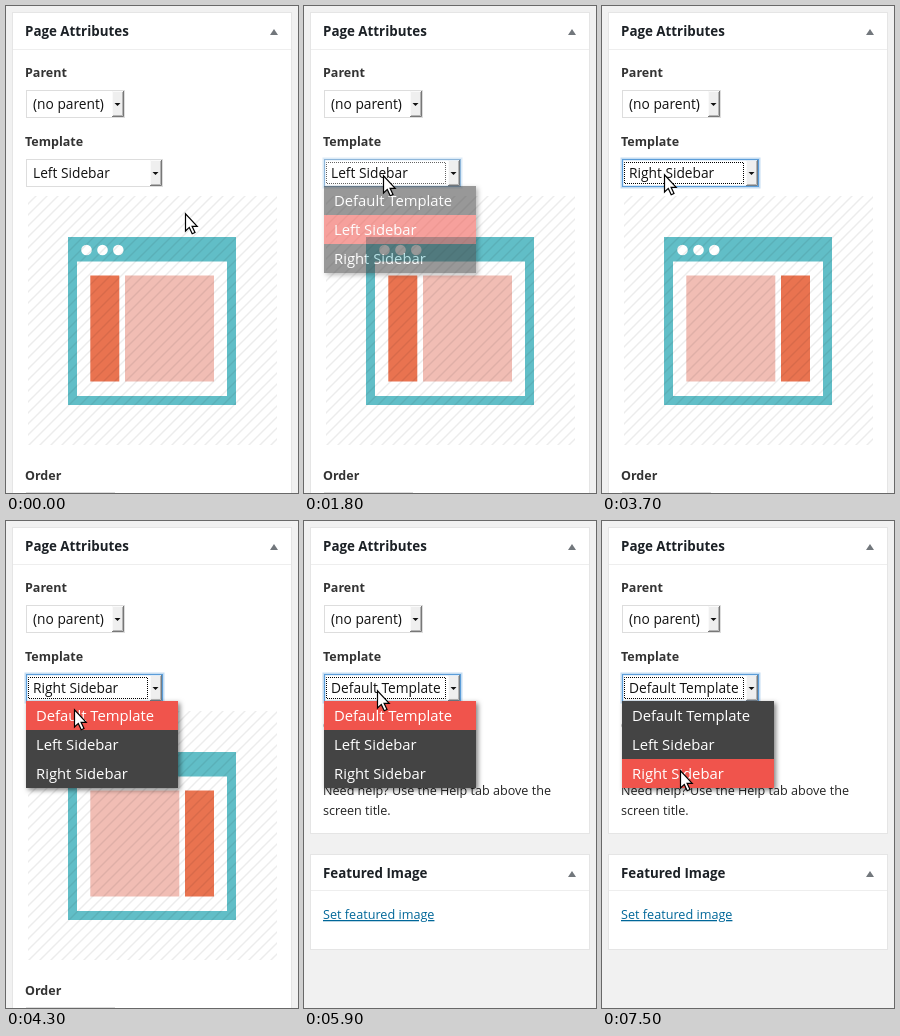
An HTML page that plays this animation: 292 px wide and 487 px high, repeating every 8000 ms.

```html
<!DOCTYPE html>
<html lang="en">
<head>
<meta charset="utf-8">
<title>Page template picker</title>
<style>
  html, body { margin: 0; width: 100%; height: 100%; overflow: hidden; background: #f1f1f1; }
  svg { display: block; width: 292px; height: 487px; font: 13.75px "Open Sans", "Noto Sans", sans-serif; fill: #111; }
  .title { font-size: 13.35px; font-weight: 700; fill: #1c2126; }
  .label { font-size: 12.5px; font-weight: 700; fill: #333; }
  .note { font-size: 12.6px; fill: #222; }
  .link { font-size: 12.65px; fill: #006799; text-decoration: underline; }
  .panel { fill: #fff; stroke: #e5e5e5; }
  .rule { stroke: #eee; }
  .field { fill: #fff; stroke: #ddd; }
  .fold { fill: #72777c; }
  #menu { font-size: 14.8px; fill: #fff; filter: drop-shadow(2px 2px 2.5px rgba(0,0,0,.5)); }
  #focus { fill: none; }
</style>
</head>
<body>
<svg viewBox="0 0 292 487">
  <defs>
    <pattern id="hatch" width="11" height="11" patternUnits="userSpaceOnUse">
      <path d="M-2 13L13 -2M-2 2L2 -2M9 13L13 9" stroke="#000" stroke-opacity=".075" stroke-width="1.4"/>
    </pattern>
    <g id="drop">
      <rect width="12" height="26" fill="#efefef"/>
      <path d="M.5 26V.5H12" fill="none" stroke="#fafafa"/>
      <path d="M0 25.5H11.5V0" fill="none" stroke="#777"/>
      <path d="M1 24.5H10.5V1" fill="none" stroke="#b5b5b5"/>
      <path d="M2.5 12H8.5L5.5 15Z" fill="#111"/>
    </g>
  </defs>

  <rect id="panel" class="panel" x="6.5" y="6.5" width="279"/>
  <path class="rule" d="M7 43.5H285"/>
  <text class="title" x="19" y="30">Page Attributes</text>
  <path class="fold" d="M264 29H272L268 23Z"/>

  <text class="label" x="19" y="71">Parent</text>
  <rect class="field" x="20.5" y="84.5" width="98" height="27"/>
  <text x="27" y="103">(no parent)</text>
  <use href="#drop" x="106" y="85"/>

  <text class="label" x="19" y="140">Template</text>
  <rect class="field" x="20.5" y="153.5" width="136" height="27"/>
  <text id="value" x="27" y="172"></text>
  <use href="#drop" x="144" y="154"/>
  <g id="focus">
    <rect x="20" y="153" width="137" height="28" stroke="#5b9dd9" stroke-opacity=".35" stroke-width="3"/>
    <rect x="20.5" y="153.5" width="136" height="27" stroke="#5b9dd9"/>
    <rect x="22.5" y="156.5" width="119" height="21" stroke="#000" stroke-dasharray="1" stroke-dashoffset=".5"/>
  </g>

  <g id="preview">
    <rect x="62" y="231" width="168" height="168" fill="#61bec7"/>
    <rect x="71" y="255.5" width="150" height="134.5" fill="#fff"/>
    <g fill="#fff">
      <circle cx="80.5" cy="244" r="5.3"/><circle cx="96.5" cy="244" r="5.3"/><circle cx="112.3" cy="244" r="5.3"/>
    </g>
    <rect id="side" y="269.5" width="29" height="106" fill="#e97350"/>
    <rect id="main" y="269.5" width="89" height="106" fill="#f1bdb4"/>
    <rect x="22" y="190" width="249" height="249" fill="url(#hatch)"/>
  </g>

  <g id="order">
    <text class="label" x="19" y="209">Order</text>
    <rect class="field" x="20.5" y="221.5" width="88" height="24"/>
    <text x="26" y="239">0</text>
    <text class="note" x="19" y="274">Need help? Use the Help tab above the</text>
    <text class="note" x="19" y="294">screen title.</text>
  </g>

  <g id="featured">
    <rect class="panel" x="6.5" y="333.5" width="279" height="95"/>
    <path class="rule" d="M7 369.5H285"/>
    <text class="title" x="19" y="357">Featured Image</text>
    <path class="fold" d="M264 356H272L268 350Z"/>
    <text class="link" x="19" y="398">Set featured image</text>
  </g>

  <g id="menu">
    <rect x="20" y="180" width="152" height="87" fill="#444"/>
    <rect id="mark" x="20" width="152" height="29" fill="#f0544c"/>
    <text x="30" y="200">Default Template</text>
    <text x="30" y="229">Left Sidebar</text>
    <text x="30" y="258">Right Sidebar</text>
  </g>

  <path id="cursor" d="M.5 .8V18L4.3 14.4L7.2 20.8L10 19.5L7.1 13.3H12.2Z" fill="#fff" stroke="#000" stroke-width="1.2"/>
</svg>
<script>
const LOOP = 8000, STEP = 100;
const TEMPLATES = ["Default Template", "Left Sidebar", "Right Sidebar"];
const START = [179, 207];
// start time, steps, target x, target y
const MOVES = [
  [400, 7, 80, 175], [1200, 4, 79, 169], [1900, 7, 80, 249], [3400, 4, 62, 168],
  [4100, 4, 69, 192], [5300, 4, 73, 169], [6100, 4, 74, 220], [7200, 4, 78, 249]
];
// time, value from then on
const MENU = [[0, 0], [1800, .55], [1900, 1], [2900, .5], [3000, 0], [4000, .55], [4100, 1], [5100, 0], [5900, 1]];
const CHOICE = [[0, 1], [2900, 2], [5100, 0]];
const FOCUS = [[0, 0], [1800, .6], [1900, 1]];

const el = id => document.getElementById(id);
const set = (id, name, value) => el(id).setAttribute(name, value);
const show = (id, on) => set(id, "visibility", on ? "visible" : "hidden");
const at = (track, t) => track.filter(k => k[0] <= t).pop()[1];
const ease = p => p * p * (3 - 2 * p);

function pointer(t) {
  let [x, y] = START;
  for (const [start, steps, tx, ty] of MOVES) {
    if (t < start) break;
    const p = ease(Math.min(1, (Math.floor((t - start) / STEP) + 1) / steps));
    x += (tx - x) * p;
    y += (ty - y) * p;
  }
  return [Math.round(x), Math.round(y)];
}

function draw(t) {
  const [x, y] = pointer(t);
  const choice = at(CHOICE, t);
  const plain = choice === 0, left = choice === 1;
  const row = y >= 180 ? Math.min(2, Math.floor((y - 180) / 29)) : choice;

  el("value").textContent = TEMPLATES[choice];
  set("focus", "opacity", at(FOCUS, t));
  show("preview", !plain);
  show("featured", plain);
  set("side", "x", left ? 84.3 : 179);
  set("main", "x", left ? 119 : 84.3);
  set("panel", "height", plain ? 306 : 571);
  set("order", "transform", `translate(0 ${plain ? 0 : 265})`);
  set("menu", "opacity", at(MENU, t));
  set("mark", "y", 180 + 29 * row);
  set("cursor", "transform", `translate(${x} ${y})`);
}

function frame() {
  draw(performance.now() % LOOP);
  requestAnimationFrame(frame);
}
frame();
</script>
</body>
</html>
```
